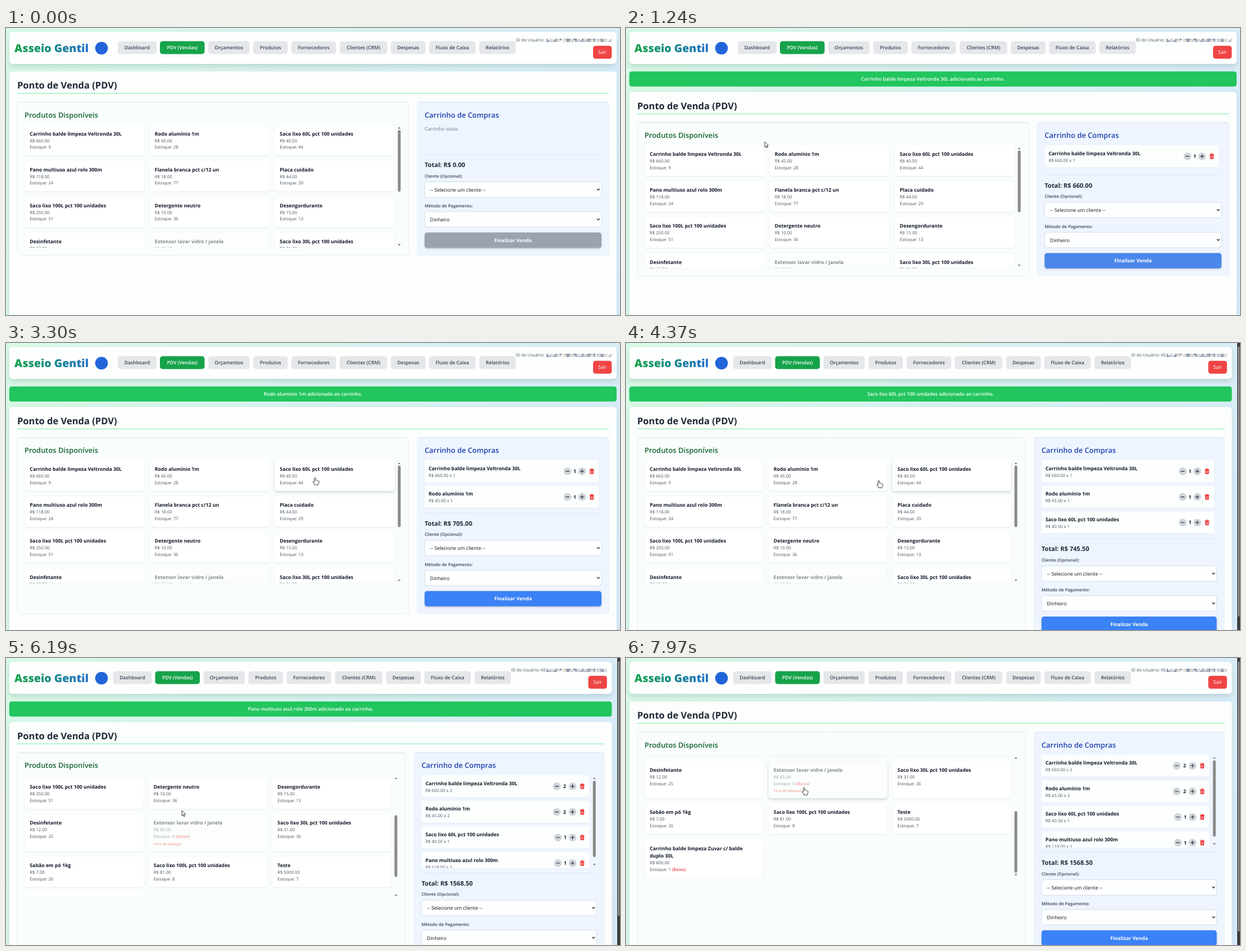
Write an HTML page with a canvas that moves like this. It is 1093 px wide and 512 px high and loops after 8000 ms.

```html
<!DOCTYPE html>
<html lang="pt-BR">
<head>
<meta charset="utf-8">
<title>Ponto de Venda</title>
<style>
  html, body { margin: 0; width: 100%; height: 100%; overflow: hidden; background: #d9f5ea; }
  canvas { display: block; width: 1093px; height: 512px; }
</style>
</head>
<body>
<canvas id="stage"></canvas>
<script>
const W = 1093, H = 512, LOOP = 8000, STEP = 70;
const canvas = document.getElementById('stage');
const dpr = window.devicePixelRatio || 1;
canvas.width = W * dpr;
canvas.height = H * dpr;
const ctx = canvas.getContext('2d');

const NAV = [
  ['Dashboard', 199, 69], ['PDV (Vendas)', 274, 79.5], ['Orçamentos', 360, 73.5],
  ['Produtos', 440, 61.5], ['Fornecedores', 508, 79.5], ['Clientes (CRM)', 594, 84.5],
  ['Despesas', 685, 62], ['Fluxo de Caixa', 753, 83], ['Relatórios', 842.5, 65]
];
const PRODUCTS = [
  ['Carrinho balde limpeza Veltronda 30L', 660, 9], ['Rodo alumínio 1m', 45, 28],
  ['Saco lixo 60L pct 100 unidades', 40.5, 44], ['Pano multiuso azul rolo 300m', 118, 24],
  ['Flanela branca pct c/12 un', 18, 77], ['Placa cuidado', 44, 29],
  ['Saco lixo 100L pct 100 unidades', 250, 51], ['Detergente neutro', 10, 36],
  ['Desengordurante', 15, 13], ['Desinfetante', 12, 25],
  ['Extensor lavar vidro / janela', 85, 0], ['Saco lixo 30L pct 100 unidades', 31, 36],
  ['Sabão em pó 1kg', 7, 26], ['Saco lixo 100L pct 100 unidades', 81, 8], ['Teste', 5000, 7],
  ['Carrinho balde limpeza Zuvar c/ balde', 800, 1, 'duplo 30L']
].map(([name, price, stock, more]) => ({ name, price, stock, more }));
const ROW_TOP = [0, 64.1, 128.2, 192.3, 267.8, 332];
const ROW_H = [55, 55, 55, 66.4, 55, 68.6];

const CLICKS = [[890, 0], [2320, 1], [3440, 2], [4650, 1], [5140, 0], [5630, 3]];
const TOAST_OFF = 6400, PAGE_BAR_ON = 3440;
const START = [994, 516];
// pointer moves: start, end, x, y
const MOVES = [
  [150, 750, 238, 208], [890, 1240, 247, 203], [1310, 1660, 334, 246], [2060, 2060, 334, 244],
  [2530, 2600, 331, 244], [2800, 3300, 550, 240], [3970, 4040, 528, 240], [4370, 4370, 450, 245],
  [4440, 4510, 330, 245], [4720, 5000, 162, 245], [5210, 5490, 183, 299], [5840, 5980, 313, 272],
  [6470, 6540, 313, 281], [6740, 7160, 316, 221], [7620, 7970, 317, 231]
];

const FONT = {
  name: '700 8.75px', small: '400 7.7px', nav: '600 8.6px', body: '400 8.7px', label: '600 7.65px',
  heading: '600 12.9px', title: '700 16.5px', total: '700 11.1px', tiny: '600 6.4px', brand: '800 19.5px'
};
const money = v => 'R$ ' + v.toFixed(2);

// y is the middle of the capitals
function text(str, x, y, font, color, align = 'left') {
  ctx.font = FONT[font] + ' "Open Sans", "Noto Sans", sans-serif';
  ctx.fillStyle = color;
  ctx.textAlign = align;
  ctx.fillText(str, x, y + parseFloat(FONT[font].slice(4)) * 0.355);
  return ctx.measureText(str).width;
}

function box(x, y, w, h, r, fill, shadow, border) {
  ctx.save();
  if (shadow) [ctx.shadowOffsetY, ctx.shadowBlur, ctx.shadowColor] = shadow;
  ctx.beginPath();
  ctx.roundRect(x, y, w, h, r);
  ctx.fillStyle = fill;
  ctx.fill();
  ctx.restore();
  if (border) {
    ctx.strokeStyle = border;
    ctx.lineWidth = 0.8;
    ctx.stroke();
  }
}

function poly(points, fill, stroke, width = 1) {
  ctx.beginPath();
  points.forEach(([x, y], i) => i ? ctx.lineTo(x, y) : ctx.moveTo(x, y));
  if (fill) { ctx.closePath(); ctx.fillStyle = fill; ctx.fill(); }
  if (stroke) { ctx.strokeStyle = stroke; ctx.lineWidth = width; ctx.stroke(); }
}

function clipped(x, y, w, h, draw) {
  ctx.save();
  ctx.beginPath();
  ctx.rect(x, y, w, h);
  ctx.clip();
  draw();
  ctx.restore();
}

function scrollbar(x, top, bottom, thumbTop, thumbH) {
  poly([[x - 2.6, top + 1.4], [x + 2.6, top + 1.4], [x, top - 1.4]], '#777');
  poly([[x - 2.6, bottom - 1.4], [x + 2.6, bottom - 1.4], [x, bottom + 1.4]], '#777');
  box(x - 2.5, thumbTop, 5, thumbH, 2.5, '#8a8a8a');
}

function pointerAt(t) {
  if (t < MOVES[0][0]) return null;
  let [x, y] = START;
  for (const [from, to, tx, ty] of MOVES) {
    if (t < from) break;
    const steps = Math.round((to - from) / STEP) + 1;
    const u = Math.min(1, (Math.floor((t - from) / STEP) + 1) / steps);
    x += (tx - x) * u;
    y += (ty - y) * u;
  }
  return [x, y];
}

function stateAt(t) {
  const cart = [];
  let toast = null;
  for (const [when, id] of CLICKS) {
    if (t < when) break;
    const line = cart.find(l => l.item === PRODUCTS[id]);
    if (line) line.qty++;
    else cart.push({ item: PRODUCTS[id], qty: 1 });
    toast = PRODUCTS[id].name + ' adicionado ao carrinho.';
  }
  if (t >= TOAST_OFF) toast = null;
  const pageBar = t >= PAGE_BAR_ON;
  const snapped = 5630 + Math.floor((t - 5630) / STEP) * STEP;
  const u = Math.max(0, Math.min(1, (snapped - 5990) / 420));
  return {
    cart, toast, pageBar,
    dy: toast ? 36.6 : 0,
    shift: pageBar ? 8.5 : 0,
    scroll: 181 * Math.sin(u * Math.PI / 2),
    gridRight: pageBar ? 686 : 692,
    divider: [225.5, 225.5, 266.5, 312, 346.5][cart.length]
  };
}

function cardRect(i, s) {
  const w = (s.gridRight - 33 - 17.2) / 3, row = Math.floor(i / 3);
  return [33 + (i % 3) * (w + 8.6), 172.5 + s.dy + ROW_TOP[row] - s.scroll, w, ROW_H[row]];
}

function cardUnder(p, s) {
  if (!p || p[1] < 172.5 + s.dy || p[1] > 392 + s.dy) return -1;
  return PRODUCTS.findIndex((_, i) => {
    const [x, y, w, h] = cardRect(i, s);
    return p[0] >= x && p[0] <= x + w && p[1] >= y && p[1] <= y + h;
  });
}

function drawHeader(s) {
  box(6, 7, 1081 - s.shift, 57, 6, '#fdfffe', [5, 8, 'rgba(0,40,30,.13)']);
  const grad = ctx.createLinearGradient(15, 0, 182, 0);
  grad.addColorStop(0, '#16a34a');
  grad.addColorStop(1, '#2563eb');
  text('Asseio Gentil', 15, 36, 'brand', grad);
  ctx.beginPath();
  ctx.arc(170, 36, 11.3, 0, 7);
  ctx.fillStyle = '#2265da';
  ctx.fill();

  NAV.forEach(([label, x, w], i) => {
    const active = i === 1;
    box(x - s.shift, 23.6, w, 22.8, 4.5, active ? '#16a34a' : '#e5e7eb');
    text(label, x - s.shift + w / 2, 35, 'nav', active ? '#fff' : '#374151', 'center');
  });

  text('ID do Usuário:' + (s.pageBar ? ' KE' : ''), 907.5 - s.shift, 21.3, 'small', '#4b5563');
  const shades = ['#d8dade', '#a9b1bf', '#e6dfd6', '#f1f3f4', '#c2c8d2', '#8f9bad'];
  let seed = 7;
  for (let x = 962; x < 1077 - s.shift; x += 3) {
    for (let y = 19; y < 25; y += 3) {
      seed = (seed * 1103 + 377) % 65536;
      ctx.fillStyle = shades[(seed >> 5) % shades.length];
      ctx.fillRect(x, y, 3, 3);
    }
  }
  box(1045 - s.shift, 31.7, 33.3, 23, 4.5, '#ef4444');
  text('Sair', 1061.7 - s.shift, 43.3, 'body', '#fff', 'center');
}

function drawCard(i, s, hover) {
  const p = PRODUCTS[i], [x, y, w, h] = cardRect(i, s);
  const fill = p.stock ? '#fefffe' : '#fbfefc';
  box(x, y, w, h, 4.5, fill, hover ? [2, 4, 'rgba(10,60,40,.2)'] : [0.7, 2, 'rgba(10,50,40,.11)']);
  ctx.globalAlpha = p.stock ? 1 : 0.5;
  const tx = x + 9.3;
  let ty = y + 16;
  text(p.name, tx, ty, 'name', '#111827');
  if (p.more) text(p.more, tx, ty += 13.8, 'name', '#111827');
  text(money(p.price), tx, ty + 12.4, 'small', '#4b5563');
  const used = text('Estoque: ' + p.stock + ' ', tx, ty + 24, 'small', '#4b5563');
  if (p.stock < 5) text('(Baixo)', tx + used, ty + 24, 'label', '#ef4444');
  if (!p.stock) text('Fora de estoque', tx, ty + 37, 'tiny', '#ef4444');
  ctx.globalAlpha = 1;
}

function drawProducts(s, hovered, bottom) {
  const { dy, gridRight } = s, top = 131.5 + dy;
  box(20, top, gridRight + 5.5, bottom - top, 5, '#f9fdfb', null, '#e1eeea');
  ctx.fillStyle = 'rgba(20,70,70,.06)';
  ctx.fillRect(22, top + 0.6, gridRight + 1.5, 1.4);
  text('Produtos Disponíveis', 33, 155 + dy, 'heading', '#166534');
  clipped(31, 172.5 + dy, gridRight - 29, 219.5, () =>
    PRODUCTS.forEach((_, i) => drawCard(i, s, i === hovered)));
  scrollbar(gridRight + 8, 178 + dy, 387 + dy, 182 + dy + s.scroll / 181 * 91, 110);
}

function roundButton(x, y, plus) {
  ctx.beginPath();
  ctx.arc(x, y, 6.9, 0, 7);
  ctx.fillStyle = '#d1d5db';
  ctx.fill();
  poly([[x - 3.3, y], [x + 3.3, y]], null, '#1f2937', 1.1);
  if (plus) poly([[x, y - 3.3], [x, y + 3.3]], null, '#1f2937', 1.1);
}

function trash(x, y) {
  poly([[x - 4, y - 3.2], [x + 4, y - 3.2]], null, '#ef2f2f', 1.3);
  poly([[x - 1.5, y - 3.5], [x - 1.2, y - 4.6], [x + 1.2, y - 4.6], [x + 1.5, y - 3.5]], null, '#ef2f2f', 1);
  box(x - 3.3, y - 2.6, 6.6, 7.4, 1, '#ef2f2f');
  for (const dx of [-1.1, 1.1]) poly([[x + dx, y - 0.8], [x + dx, y + 3.2]], null, '#fff', 0.9);
}

function drawCartLine({ item, qty }, x, y, right) {
  box(x, y, right - x, 39.3, 4, '#fcfffe', [0.6, 1.5, 'rgba(20,50,80,.08)']);
  text(item.name, x + 7, y + 14.3, 'name', '#111827');
  text(money(item.price) + ' x ' + qty, x + 7, y + 26.7, 'small', '#4b5563');
  const cy = y + 19.8;
  roundButton(right - (qty > 1 ? 58 : 56), cy, false);
  text(qty, right - (qty > 1 ? 44 : 43), cy, 'name', '#111827', 'center');
  roundButton(right - 30, cy, true);
  trash(right - 12.7, cy);
}

function drawSelect(label, value, x, right, y) {
  text(label, x, y, 'label', '#374151');
  box(x, y + 10.4, right - x, 27.6, 4, '#fdfeff', null, '#cbd5e1');
  text(value, x + 9.6, y + 24.6, 'body', '#111');
  const cx = right - 5.6, cy = y + 24;
  poly([[cx - 2.4, cy - 1.2], [cx, cy + 1.2], [cx + 2.4, cy - 1.2]], null, '#222', 1.3);
}

function drawCart(s, t, bottom) {
  const { dy, cart, pageBar } = s;
  const left = pageBar ? 726.5 : 732, panelRight = 1073.5 - s.shift;
  const x = left + 13.2, right = panelRight - 13.5, top = 131.5 + dy;
  box(left, top, panelRight - left, bottom - top, 5, '#eef5ff', null, '#e3edf6');
  ctx.fillStyle = 'rgba(20,60,90,.05)';
  ctx.fillRect(left + 2, top + 0.6, panelRight - left - 4, 1.4);
  text('Carrinho de Compras', x, 155 + dy, 'heading', '#1e40af');

  const listTop = 172.5 + dy, overflow = cart.length > 3;
  if (!cart.length) text('Carrinho vazio.', x, 180 + dy, 'body', '#6b7280');
  clipped(x - 2, listTop - 1, right - x + 4, overflow ? 166.5 : 200, () =>
    cart.forEach((line, i) => drawCartLine(line, x, listTop + i * 45.7, right - (overflow ? 13 : 4.5))));
  if (overflow) scrollbar(right - 4.2, 178 + dy, 332 + dy, 182.5 + dy, 136);

  const d = s.divider + dy;
  ctx.fillStyle = '#dfe7f0';
  ctx.fillRect(x, d - 0.4, right - x, 0.9);
  const total = cart.reduce((sum, l) => sum + l.item.price * l.qty, 0);
  text('Total: ' + money(total), x, d + 18.6, 'total', '#1f2937');
  drawSelect('Cliente (Opcional):', '-- Selecione um cliente --', x, right, d + 38.6);
  drawSelect('Método de Pagamento:', 'Dinheiro', x, right, d + 91.8);

  const u = Math.max(0, Math.min(1, (t - 890) / 420));
  const mix = (a, b) => Math.round(a + (b - a) * u);
  const fill = `rgb(${mix(156, 59)},${mix(163, 130)},${mix(175, 246)})`;
  box(x, d + 139.3, right - x, 27.4, 4.5, fill, [1.5, 3, 'rgba(0,0,0,.2)']);
  text('Finalizar Venda', (x + right) / 2, d + 153.2, 'name', '#fff', 'center');
}

function drawPointer([x, y], hand) {
  ctx.save();
  ctx.translate(x, y);
  ctx.lineJoin = 'round';
  if (hand) {
    ctx.beginPath();
    ctx.moveTo(-1.2, 8);
    ctx.lineTo(-1.2, 1.2);
    ctx.quadraticCurveTo(0, -0.8, 1.2, 1.2);
    ctx.lineTo(1.2, 5);
    ctx.quadraticCurveTo(2.6, 4, 3.4, 5.4);
    ctx.quadraticCurveTo(4.8, 4.6, 5.5, 6);
    ctx.quadraticCurveTo(7.2, 5.6, 7.2, 7.4);
    ctx.quadraticCurveTo(7.3, 10.5, 5.6, 12);
    ctx.lineTo(5.6, 13.2);
    ctx.lineTo(-0.4, 13.2);
    ctx.lineTo(-0.6, 12);
    ctx.lineTo(-3.6, 8.2);
    ctx.quadraticCurveTo(-3.4, 6.4, -1.2, 8);
    ctx.closePath();
    ctx.fillStyle = '#fff';
    ctx.fill();
    ctx.strokeStyle = '#222';
    ctx.lineWidth = 0.9;
    ctx.stroke();
  } else {
    poly([[0, 0], [0, 9.4], [2.1, 7.5], [3.6, 10.8], [5.1, 10.1], [3.7, 6.9], [6.5, 6.7], [0, 0]], '#fff', '#222', 0.9);
  }
  ctx.restore();
}

function draw(t) {
  const s = stateAt(t), pointer = pointerAt(t);
  const panelW = 1081 - s.shift;
  ctx.setTransform(dpr, 0, 0, dpr, 0, 0);
  ctx.textRendering = 'geometricPrecision';
  const bg = ctx.createLinearGradient(0, 0, W, H);
  bg.addColorStop(0, '#d9f9e6');
  bg.addColorStop(1, '#d9eafb');
  ctx.fillStyle = bg;
  ctx.fillRect(0, 0, W, H);

  drawHeader(s);
  if (s.toast) {
    box(5.8, 77.4, panelW + 0.2, 27.2, 4.5, '#22c55e');
    text(s.toast, 6 + panelW / 2, 91.3, 'nav', '#fff', 'center');
  }
  box(6, 77.4 + s.dy, panelW, H, 6, '#fcfefd', [3, 8, 'rgba(0,40,30,.1)']);
  text('Ponto de Venda (PDV)', 20, 102.3 + s.dy, 'title', '#1f2937');
  ctx.fillStyle = '#86efac';
  ctx.fillRect(20, 116 + s.dy, 1053.5 - s.shift, 1.2);

  const bottom = s.divider + s.dy + 180;
  drawProducts(s, cardUnder(pointerAt(t - STEP), s), bottom);
  drawCart(s, t, bottom);

  if (s.pageBar) {
    ctx.fillStyle = '#3a3a3a';
    ctx.fillRect(1088, 0, 5, H);
    box(1089.2, 6, 3, (s.cart.length > 3 && s.toast ? 460 : 488) - 6, 1.5, '#939393');
  }
  if (pointer) drawPointer(pointer, cardUnder(pointer, s) >= 0);
}

const began = performance.now();
function frame() {
  draw((performance.now() - began) % LOOP);
  requestAnimationFrame(frame);
}
frame();
</script>
</body>
</html>
```
